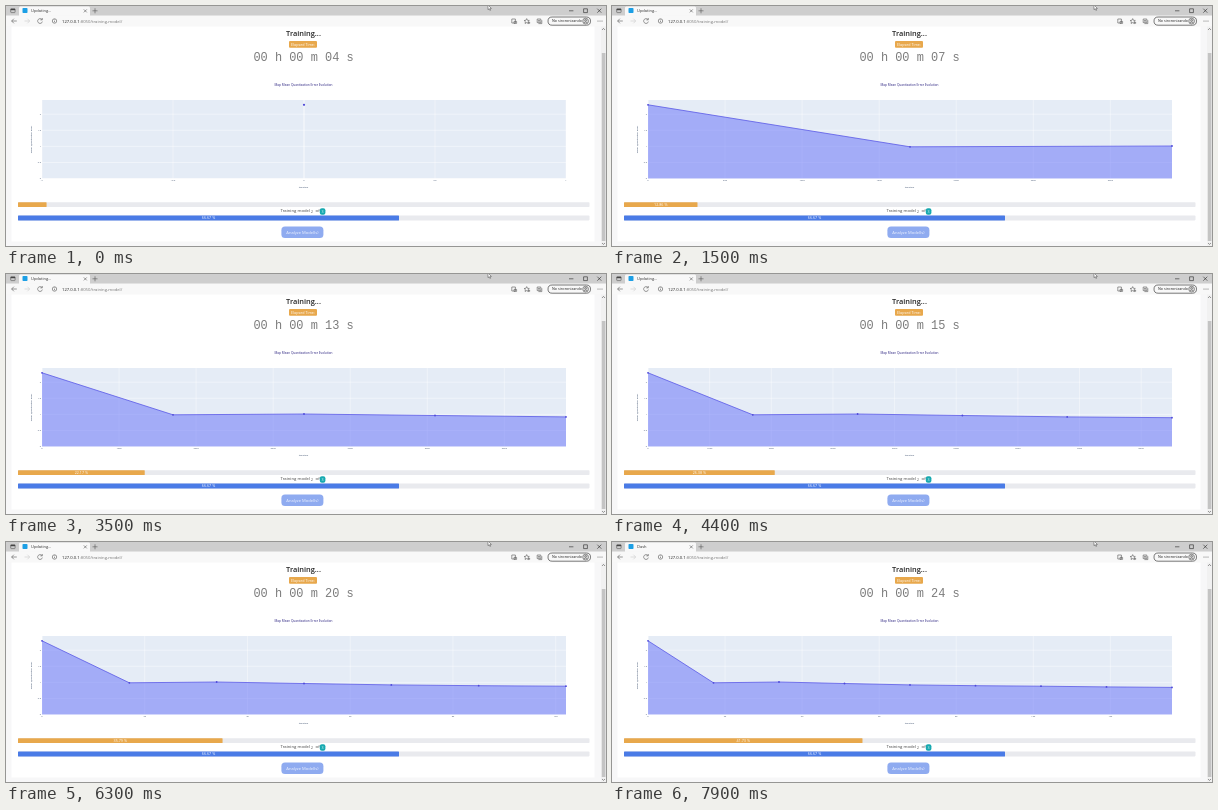
An HTML page for the animation above (8000 ms loop, 600x240 px).

```html
<!DOCTYPE html>
<html lang="en">
<head>
<meta charset="utf-8">
<title>Training</title>
<style>
  html, body { margin: 0; width: 100%; height: 100%; overflow: hidden; background: #fff; }
  svg { display: block; width: 600px; height: 240px; font-family: "Open Sans", "Noto Sans", sans-serif; }
  .mid { text-anchor: middle; }
  .icon { fill: none; stroke: #555; stroke-width: .6; }
  .tick { font-size: 2.3px; fill: #2a3f5f; }
  .label { font-size: 3.7px; fill: #fff; text-anchor: middle; }
</style>
</head>
<body>
<svg viewBox="0 0 600 240">
  <!-- browser window -->
  <rect width="600" height="240" fill="#f7f7f8"/>
  <rect width="600" height="10" fill="#cecece"/>
  <path d="M13 10V2q0-1.5 1.5-1.5h68q1.5 0 1.5 1.5v8z" fill="#f8f8f8"/>
  <rect y="9.5" width="600" height="11" fill="#f8f8f8"/>
  <rect x="4.7" y="2.8" width="4.4" height="3.8" rx=".6" class="icon"/>
  <rect x="4.7" y="2.8" width="4.4" height="1.4" fill="#444"/>
  <rect x="16.5" y="2" width="5" height="5" rx=".8" fill="#1c9fe5"/>
  <text id="tab" x="25" y="6.3" font-size="4" fill="#333"></text>
  <g class="icon">
    <path d="M77.8 3.4l3 3m0-3l-3 3M86.5 4.8h5M89 2.3v5"/>
    <path d="M563 4.8h4.4M577.6 2.8h3.8v3.8h-3.8zM591.3 2.7l4 4m0-4l-4 4" stroke="#222"/>
    <path d="M10.8 15h-5.2m2.3-2.3L5.6 15l2.3 2.3"/>
    <path d="M18.5 15h5.2m-2.3-2.3l2.3 2.3-2.3 2.3" stroke="#ccc"/>
    <path d="M36 13.6a2.4 2.4 0 1 0 .4 2M36.3 12v1.9h-1.9"/>
    <circle cx="48.5" cy="15" r="2.2"/>
    <path d="M48.5 14.7v1.5M48.5 13.6v.5"/>
    <path d="M505.8 13h3.6v4h-3.6zM508 15.4h2.6v2H508z"/>
    <path d="M520.7 12.6l.8 1.7 1.8.2-1.3 1.2.3 1.8-1.6-.9-1.6.9.3-1.8-1.3-1.2 1.8-.2zM522 16.8h2.2m-1.1-1.1v2.2"/>
    <path d="M531.2 13h3.6v3.6h-3.6zM532.4 17.6h3.4v-3.4M533 13.8v2m-1-1h2"/>
    <rect x="542" y="11" width="42.5" height="8.2" rx="4.1" stroke="#222"/>
    <circle cx="579.6" cy="15.1" r="2.9" fill="#ddd"/>
    <circle cx="579.6" cy="14.3" r=".9"/>
    <path d="M577.8 16.8q1.8-1.8 3.6 0"/>
  </g>
  <g fill="#555"><circle cx="592" cy="15" r=".5"/><circle cx="594" cy="15" r=".5"/><circle cx="596" cy="15" r=".5"/></g>
  <text x="56" y="16.7" font-size="4.2" fill="#222">127.0.0.1<tspan fill="#777">:8050/training-model/</tspan></text>
  <text x="546" y="16.4" font-size="3.7" fill="#222">No sincronizando</text>
  <path d="M482 -1v4.7l1.1-1 .8 1.8.8-.4-.8-1.7h1.5z" fill="#fff" stroke="#222" stroke-width=".4"/>

  <!-- page -->
  <rect x="5.5" y="20.5" width="583" height="215" fill="#fff"/>
  <rect x="595" y="20.5" width="5" height="219.5" fill="#f1f1f1"/>
  <rect x="595.8" y="47" width="3.6" height="188" fill="#c4c4c4"/>
  <path d="M596 24l1.5-1.6 1.5 1.6M596 237l1.5 1.4 1.5-1.4" class="icon"/>
  <text class="mid" x="297.5" y="30.4" font-size="7.4" font-weight="600" fill="#222">Training...</text>
  <rect x="283" y="35" width="28" height="6.7" rx="1" fill="#e8a84c"/>
  <text class="mid" x="297" y="39.8" font-size="3.7" fill="#fff">Elapsed Time:</text>
  <text id="clock" x="247.4" y="54.7" font-size="11.95" fill="#7c7c7c" font-family="'Liberation Mono', monospace" xml:space="preserve"></text>

  <text class="mid" x="297.5" y="79.9" font-size="3.15" fill="#2c2480">Map Mean Quantization Error Evolution</text>
  <rect x="36" y="94" width="524" height="78.8" fill="#e5ecf6"/>
  <g id="grid"></g>
  <path id="area" fill="#636efa" fill-opacity=".5"/>
  <path id="line" fill="none" stroke="#5b5ae6" stroke-width=".8"/>
  <g id="dots" fill="#4d48d8"></g>
  <text class="mid" x="297.5" y="181.8" font-size="2.4" fill="#2a3f5f">Iteration</text>
  <text class="mid" transform="translate(26.3 133.5) rotate(-90)" font-size="2.4" fill="#2a3f5f">Mean Quantization Error</text>

  <rect x="12" y="196.2" width="571.5" height="4.8" rx=".8" fill="#e9eaee"/>
  <rect id="bar" x="12" y="196.2" height="4.8" rx=".5" fill="#e8a84c"/>
  <text id="pct" class="label" y="199.9"></text>
  <text x="274.5" y="206" font-size="4.25" fill="#444">Training model</text>
  <text x="304.9" y="207.2" font-size="3.4" fill="#444">2</text>
  <text x="309.6" y="206" font-size="4.25" fill="#444">of</text>
  <rect x="313.8" y="202.2" width="5.6" height="6.6" rx="2" fill="#17a9b0"/>
  <text class="mid" x="316.6" y="206.9" font-size="3.6" fill="#fff">3</text>
  <rect x="12" y="209.6" width="571.5" height="4.8" rx=".8" fill="#e9eaee"/>
  <rect x="12" y="209.6" width="381" height="4.8" rx=".5" fill="#4a7be6"/>
  <text class="label" x="202.5" y="213.3">66.67 %</text>
  <rect x="275.4" y="220.6" width="42" height="11.5" rx="3.6" fill="#8fabf0"/>
  <text class="mid" x="296.4" y="228" font-size="4.1" fill="#f2f5ff">Analyze Model(s)</text>
</svg>
<script>
const LOOP = 8000, STEP = 100;
const LEFT = 36, WIDTH = 524, BASE = 172.6;
const PER_POINT = 1700;
const pointY = [98.8, 140.8, 140, 141.5, 142.9, 143.7, 144.2, 144.9, 145.4];
const pointTimes = [400, 1100, 2200, 3300, 4300, 5400, 6500, 7600];
const progress = [[0, 5], [1500, 12.86], [2600, 17.97], [4400, 26.38], [5500, 31.8], [7000, 39.29], [7900, 41.73]];
const idle = [[100, 300], [1200, 1400], [2000, 2200], [2900, 3100], [3700, 3900],
  [4600, 4800], [5700, 5900], [6900, 7100], [7700, 8000]];

const $ = id => document.getElementById(id);

function percentAt(t) {
  let i = 0;
  while (i < progress.length - 2 && t > progress[i + 1][0]) i++;
  const [t0, a] = progress[i], [t1, b] = progress[i + 1];
  return a + (b - a) * Math.min(1, (t - t0) / (t1 - t0));
}

// Smallest 1-2-5 step that gives about ten ticks
function tickStep(span) {
  const rough = span / 10, base = 10 ** Math.floor(Math.log10(rough));
  return base * [1, 2, 5, 10].find(m => m * base >= rough);
}

const gridLine = (d, w) => `<path d="${d}" stroke="#fff" stroke-width="${w}"/>`;
const tickLabel = (x, y, s, anchor) => `<text class="tick" x="${x}" y="${y}" text-anchor="${anchor}">${s}</text>`;

function drawChart(n) {
  const min = n ? 0 : -1, max = n ? n * PER_POINT : 1;
  const step = n ? tickStep(max) : 0.5;
  const px = v => LEFT + WIDTH * (v - min) / (max - min);
  let grid = "";
  for (let v = min; v <= max; v += step) {
    const x = px(v), text = max >= 10000 && v ? v / 1000 + "k" : String(v).replace("-", "\u2212");
    grid += gridLine(`M${x} 94V172.8`, v ? 0.4 : 0.8) + tickLabel(x, 175.4, text, "middle");
  }
  for (let i = 0; i < 5; i++) {
    const y = BASE - 16.1 * i;
    grid += gridLine(`M36 ${y}H560`, i ? 0.4 : 0.8) + tickLabel(35, y + 0.8, i / 2, "end");
  }
  $("grid").innerHTML = grid;

  const pts = pointY.slice(0, n + 1).map((y, i) => [px(i * PER_POINT), y]);
  const path = n ? "M" + pts.map(p => p.join(" ")).join("L") : "";
  $("line").setAttribute("d", path);
  $("area").setAttribute("d", n ? `${path}V${BASE}H${LEFT}Z` : "");
  $("dots").innerHTML = pts.map(([x, y]) => `<circle cx="${x}" cy="${y}" r="${n ? 0.9 : 1.1}"/>`).join("");
}

let shown = -1;
function draw(t) {
  const n = pointTimes.filter(p => p <= t).length;
  if (n !== shown) drawChart(shown = n);

  const sec = 4 + Math.max(0, Math.floor((t - 400) / 385) + 1);
  $("clock").textContent = `00 h 00 m ${String(sec).padStart(2, "0")} s`;
  $("tab").textContent = idle.some(([a, b]) => t >= a && t < b) ? "Dash" : "Updating...";

  const p = percentAt(t), w = 5.715 * p;
  $("bar").setAttribute("width", w);
  $("pct").setAttribute("x", 12 + w / 2);
  $("pct").textContent = p < 10 ? "" : p.toFixed(2) + " %";
}

const start = performance.now();
function frame() {
  const t = (performance.now() - start) % LOOP;
  draw(Math.floor(t / STEP) * STEP);
  requestAnimationFrame(frame);
}
frame();
</script>
</body>
</html>
```
